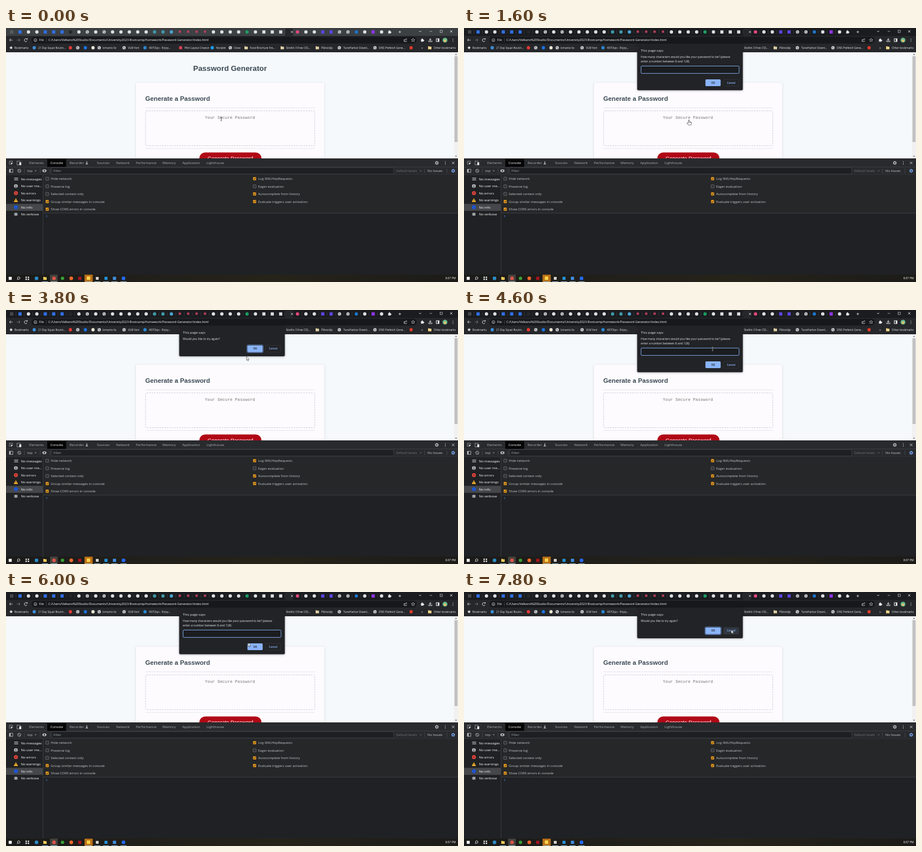
Recreate the animation shown at these times as an HTML page with a canvas. Size 800 by 450 pixels, loop 8 s.

```html
<!DOCTYPE html>
<html lang="en">
<head>
<meta charset="utf-8">
<title>Password Generator</title>
<style>
html, body { margin: 0; width: 100%; height: 100%; overflow: hidden; background: #202124; }
canvas { display: block; width: 100vw; height: 100vh; }
</style>
</head>
<body>
<canvas id="stage"></canvas>
<script>
const W = 800, H = 450, LOOP = 8000, STEP = 200;
const FOCUS_AT = 1000;
const PAGE_TOP = 43, PAGE_END = 231;
const canvas = document.getElementById('stage');
const ratio = window.devicePixelRatio || 1;
canvas.width = W * ratio;
canvas.height = H * ratio;
const c = canvas.getContext('2d');
c.scale(ratio, ratio);

const UI = '"Open Sans", "Noto Sans", sans-serif';
const ARIAL = '"Liberation Sans", Arial, sans-serif';
const MONO = '"Liberation Mono", monospace';
const LIGHT = '#e8eaed', GREY = '#9aa0a6', BLUE = '#8ab4f8';

// y is the middle of the line
function text(s, x, y, size, color = LIGHT, { font = UI, weight = 400, align = 'left' } = {}) {
  c.font = `${weight} ${size}px ${font}`;
  c.textAlign = align;
  c.fillStyle = color;
  c.fillText(s, x, y + size * 0.35);
}

function rect(x, y, w, h, color) {
  c.fillStyle = color;
  c.fillRect(x, y, w, h);
}

function round(x, y, w, h, r, fill, stroke, width = 1) {
  c.beginPath();
  c.roundRect(x, y, w, h, r);
  if (fill) { c.fillStyle = fill; c.fill(); }
  if (stroke) { c.strokeStyle = stroke; c.lineWidth = width; c.stroke(); }
}

function box(x, y, w, h, color, width = 0.8) {
  c.strokeStyle = color;
  c.lineWidth = width;
  c.strokeRect(x, y, w, h);
}

function dot(x, y, r, color) {
  c.beginPath();
  c.arc(x, y, r, 0, 7);
  c.fillStyle = color;
  c.fill();
}

function ring(x, y, r, color, width = 0.8) {
  c.beginPath();
  c.arc(x, y, r, 0, Math.PI * 2);
  c.strokeStyle = color;
  c.lineWidth = width;
  c.stroke();
}

function square(x, y, size, color) {
  rect(x - size / 2, y - size / 2, size, size, color);
}

// Each path is a flat list of x, y relative to the origin
function line(x, y, pts, color = LIGHT, width = 0.8) {
  trace(x, y, pts);
  c.strokeStyle = color;
  c.lineWidth = width;
  c.stroke();
}

function shape(x, y, pts, color) {
  trace(x, y, pts);
  c.closePath();
  c.fillStyle = color;
  c.fill();
}

function trace(x, y, pts) {
  c.beginPath();
  for (let i = 0; i < pts.length; i += 2) c.lineTo(x + pts[i], y + pts[i + 1]);
}

function cross(x, y, r, color = LIGHT) {
  line(x, y, [-r, -r, r, r], color);
  line(x, y, [r, -r, -r, r], color);
}

function globe(x, y) {
  dot(x, y, 3, '#c3c6ca');
  line(x, y, [-2, -1, 0, -0.5, 1, 1, 0, 2], '#5f6368', 0.8);
}

function gear(x, y, color) {
  ring(x, y, 2, color, 1.3);
  for (let a = 0; a < 8; a++) {
    const u = Math.cos(a * Math.PI / 4), v = Math.sin(a * Math.PI / 4);
    line(x, y, [u * 2.4, v * 2.4, u * 3.4, v * 3.4], color, 1);
  }
}

function dots(x, y) {
  for (const d of [-2.2, 0, 2.2]) dot(x, y + d, 0.6, LIGHT);
}

function star(x, y, r, fill) {
  const pts = [];
  for (let i = 0; i < 10; i++) {
    const a = i * Math.PI / 5 - Math.PI / 2, d = i % 2 ? r * 0.45 : r;
    pts.push(d * Math.cos(a), d * Math.sin(a));
  }
  if (fill) shape(x, y, pts, LIGHT);
  else line(x, y, [...pts, pts[0], pts[1]], LIGHT, 0.6);
}

function puzzle(x, y) {
  rect(x - 2.5, y - 1.5, 4.4, 4.2, LIGHT);
  dot(x - 0.3, y - 2, 1.1, LIGHT);
  dot(x + 2.2, y + 0.5, 1.1, LIGHT);
}

function folder(x, y, color = '#f2d58a') {
  rect(x - 3, y - 2.6, 2.6, 1.4, color);
  rect(x - 3, y - 1.9, 6, 4.6, color);
}

function caret(x, y, color = GREY) {
  shape(x, y, [-1.5, -0.8, 1.5, -0.8, 0, 1.2], color);
}

const tabColors = {
  b: '#2f6fe4', w: '#dcdee0', n: '#23272b', g: '#c3c6ca', t: '#3f98a6', p: '#4aa3cf',
  r: '#b8405d', e: '#1a9c61', k: '#e0487a', v: '#5b45e0', u: '#1e73c8', m: '#8f35e6'
};
const tabs = 'gbwwbbbnwgwgwwwwwttprrrrwwwwewwww kwwvvgguwmw';

function drawTabs(focused) {
  rect(0, 0, W, 14, focused ? '#1b1c1f' : '#3c4043');
  [...tabs].forEach((key, i) => {
    const x = 10 + i * 14.88;
    if (i) rect(x - 7.5, 4, 0.5, 6, '#4a4d51');
    if (key === ' ') {
      round(x - 7, 1, 14, 14, 2, '#25272a');
      cross(506, 7, 1.6);
    } else if ('bmv'.includes(key)) square(x, 7, 5.8, tabColors[key]);
    else if (key === 'r') square(x, 6.5, 4, tabColors[key]);
    else if (i === 0) {
      for (const d of [-2, 0, 2]) rect(x - 3, 6.6 + d, 6, 0.8, '#80868b');
    } else if (i > 29 && i < 33) square(x, 7, 5.6, tabColors[key]);
    else if (key === 'g') globe(x, 7);
    else dot(x, 7, 3, tabColors[key]);
  });
  puzzle(679, 7);
  line(697, 7, [-2.3, 0, 2.3, 0]);
  line(697, 7, [0, -2.3, 0, 2.3]);
  line(733, 6, [-2, -1, 0, 1, 2, -1]);
  line(752, 6, [-2.2, 0, 2.2, 0], LIGHT, 0.6);
  box(768.2, 4, 4, 4, LIGHT, 0.6);
  cross(788, 6, 2);
}

function drawAddressBar() {
  rect(0, 14, W, PAGE_TOP - 14, '#25272a');
  round(45, 15.5, 682, 12, 6, '#17181b');
  line(9, 21.5, [3, 0, -3, 0, -0.4, -2.5, -3, 0, -0.4, 2.5], '#c4c7c5');
  line(22, 21.5, [-3, 0, 3, 0, 0.4, -2.5, 3, 0, 0.4, 2.5], '#71767b');
  c.beginPath();
  c.arc(35, 21.5, 2.6, 0.5, 5.6);
  c.strokeStyle = LIGHT;
  c.lineWidth = 0.9;
  c.stroke();
  shape(37, 19.5, [-1.4, 0.8, 1.2, 0.8, 1.2, -1.8], LIGHT);
  ring(52, 21.5, 2.5, LIGHT, 0.7);
  line(52, 21.5, [0, -0.3, 0, 1.5]);
  text('File', 58.5, 21.5, 5.5);
  rect(71, 18, 0.5, 7, '#5f6368');
  text('C:/Users/Velkans%20Studio/Documents/University2023-Bootcamp/homework/Password-Generator/index.html', 75, 21.5, 5.5, '#fff');
  line(707, 21.5, [-1, -1, -2.5, -1, -2.5, 2.5, 2, 2.5, 2, 1], LIGHT, 0.7);
  line(707, 21.5, [-1, 1, 0, -1.5, 2.6, -1.5, 1.2, -3], LIGHT, 0.7);
  star(720.5, 21.5, 3.2);
  puzzle(737, 21.5);
  line(751, 21, [0, -3, 0, 1.2, -1.8, -0.6, 0, 1.2, 1.8, -0.6], LIGHT, 1);
  line(751, 21, [-3, 1.5, -3, 3, 3, 3, 3, 1.5], LIGHT, 1);
  box(761.5, 19, 5, 5, LIGHT, 1);
  rect(764.2, 19, 2.4, 5, LIGHT);
  dot(777, 21.5, 4.3, '#65b98f');
  dot(777, 22.5, 2.2, '#e8c168');
  dots(791, 21.5);
}

// icon x, icon colour ('g' globe, 'f' folder), label x, label
const bookmarks = [
  [50, '#3e8ed8', 57, '21 Day Squat Routin...'],
  [114, '#e53935'], [127, 'g'], [140.5, '#1b74e4'], [154, '#ece6d6'],
  [165, 'g', 171, 'Izmanto šo'], [209, 'g', 216, 'VLM font'],
  [246, '#2a86d1', 253, '407Clips - Enjoy...'], [309, '#d84055', 316, 'Plim Layout Creator'],
  [365, '#1d9bf0', 372, 'Norplet'], [397, 'g', 403, 'Close'],
  [425, 'f', 431.5, 'Food Brochure Fre...'], [489, 'f', 495.5, 'SiteKin 3 Free CSS...'],
  [551, 'f', 558, 'Plānotājs'], [590, 'g', 597, 'TuneHarbor Downl...'],
  [653, 'g', 660, 'DNS Prefetch Gene...'], [717, '#dd3b2a']
];

function drawBookmarks() {
  star(9, 35, 3.2, true);
  text('Bookmarks', 15, 35, 4.75);
  for (const [x, icon, tx, label] of bookmarks) {
    if (icon === 'g') globe(x, 35);
    else if (icon === 'f') folder(x, 35, '#dfcfa4');
    else dot(x, 35, 2.9, icon);
    if (label) text(label, tx, 35, 4.75);
  }
  text('»', 735, 34.5, 6);
  folder(750, 35);
  text('Other bookmarks', 757, 35, 4.75);
}

function drawPage() {
  const height = PAGE_END - PAGE_TOP;
  rect(0, PAGE_TOP, W, height, '#f5f9fc');
  c.save();
  c.beginPath();
  c.rect(0, PAGE_TOP, 793, height);
  c.clip();
  c.shadowColor = 'rgba(0,0,0,.15)';
  c.shadowBlur = 3.4 * ratio;
  c.shadowOffsetY = 0.8 * ratio;
  round(230, 97, 333.3, 180, 2, '#fdfbfe');
  c.shadowColor = 'transparent';
  const ink = '#3b4a54';
  text('Password Generator', 396.5, 71.6, 13.33, ink, { font: ARIAL, weight: 700, align: 'center' });
  text('Generate a Password', 246.6, 125, 11.25, ink, { font: ARIAL, weight: 700 });
  rect(246.6, 141, 300, 0.9, '#e2e4e7');
  rect(246.6, 212.8, 300, 0.9, '#e2e4e7');
  c.setLineDash([2.6, 1.8]);
  round(247, 146.8, 299.5, 61.7, 2, null, '#c3c5cf', 0.9);
  c.setLineDash([]);
  text('Your Secure Password', 396.4, 158.5, 7.4, '#757575', { font: MONO, align: 'center' });
  round(342.2, 220.4, 110, 21, 10.4, '#b00816');
  text('Generate Password', 397.2, 230.3, 9.17, '#fff', { font: ARIAL, align: 'center' });
  c.restore();
  rect(792.9, PAGE_TOP, 7.1, height, '#f1f1f1');
  rect(793.8, 50, 5.4, 152, '#c1c1c1');
  shape(796.5, 46.5, [-1.6, 1, 1.6, 1, 0, -1], '#555');
  shape(796.5, 227.5, [-1.6, -1, 1.6, -1, 0, 1], '#555');
}

function checkbox(x, y, label, on) {
  round(x - 2.7, y - 2.7, 5.4, 5.4, 0.8, on ? '#f5a11c' : '#303134', on ? null : '#85888c', 0.6);
  if (on) line(x, y, [-1.6, 0, -0.4, 1.3, 1.7, -1.4], '#202124', 1);
  text(label, x + 6.3, y, 5.9, '#c3c7cb');
}

function drawToolsHeader() {
  rect(0, PAGE_END, W, 260 - PAGE_END, '#292a2d');
  rect(0, 245.8, W, 0.6, '#494c50');
  rect(0, 259.8, W, 0.6, '#494c50');
  rect(73, 232, 33.5, 14, '#050506');
  line(9, 239, [2.5, -0.5, 2.5, -3, -3, -3, -3, 2.5, -0.5, 2.5], GREY);
  shape(9, 239, [-0.8, -0.8, 3.5, 0.8, 1.6, 1.6, 0.8, 3.5], LIGHT);
  box(19.5, 236, 5.5, 6.5, GREY);
  rect(23.5, 238, 3.4, 5, LIGHT);
  const labels = [[41, 'Elements'], [78.5, 'Console'], [112.5, 'Recorder'], [161, 'Sources'], [195, 'Network'],
    [230, 'Performance'], [277, 'Memory'], [312, 'Application'], [355, 'Lighthouse']];
  for (const [x, s] of labels) text(s, x, 239, 6, s === 'Console' ? '#fff' : '#aeb3b8');
  shape(143, 239, [-0.8, -2.8, 0.8, -2.8, 0.8, -0.6, 2.4, 2.8, -2.4, 2.8, -0.8, -0.6], GREY);
  rect(28, 235, 0.5, 8, '#494c50');
  gear(762.5, 239, '#bdc1c6');
  dots(777.5, 239);
  cross(791.5, 239, 2.2);

  box(6, 250.2, 6, 5.6, '#bdc1c6');
  rect(6, 250.2, 2.2, 5.6, '#bdc1c6');
  ring(23.5, 253, 2.8, '#bdc1c6');
  line(23.5, 253, [-2, -2, 2, 2], '#bdc1c6');
  for (const x of [32, 60, 78, 740, 780]) rect(x, 249, 0.5, 8, '#55585c');
  text('top', 37.5, 253, 5.9, '#c3c7cb');
  caret(52.5, 253);
  c.beginPath();
  c.ellipse(68, 253, 3.6, 2.4, 0, 0, 7);
  c.fillStyle = '#bdc1c6';
  c.fill();
  dot(68, 253, 1.3, '#292a2d');
  rect(81, 247.5, 605, 11, '#1e1f22');
  box(81, 247.5, 605, 11, '#44474b', 0.6);
  text('Filter', 84, 253, 5.9, '#a2a6ab');
  text('Default levels', 690.5, 253, 5.9, '#6d7175');
  caret(734, 253, '#6d7175');
  text('No Issues', 746, 253, 5.9, '#c3c7cb');
  gear(791.5, 253, '#7cacf8');
}

function drawTools() {
  drawToolsHeader();
  rect(0, 260.4, W, 177, '#202124');
  rect(66, 260.4, W - 66, 67.6, '#262729');
  rect(0, 311.5, 65, 12.4, '#45474b');
  rect(65.2, 260, 0.6, 177, '#494c50');
  rect(66, 327.7, W - 66, 0.6, '#494c50');

  const rows = ['messages', 'user me...', 'errors', 'warnings', 'info', 'verbose'];
  rows.forEach((s, i) => text('No ' + s, 26.5, 267.5 + i * 12.5, 5.95, '#fff'));
  for (const d of [-2, 0, 2]) rect(14.5, 267 + d, 7, 0.9, '#bdc1c6');
  dot(17.5, 280, 3.3, '#bdc1c6');
  dot(17.5, 279, 1.1, '#3c4043');
  rect(15.8, 281, 3.4, 1.2, '#3c4043');
  dot(17.5, 292.5, 3.5, '#e8453c');
  cross(17.5, 292.5, 1.4, '#202124');
  shape(17.5, 305, [0, -3.4, 3.8, 3.2, -3.8, 3.2], '#fdb52b');
  line(17.5, 305, [0, -1.2, 0, 1], '#202124');
  dot(17.5, 317.6, 3.5, '#1a56db');
  line(17.5, 317.6, [0, -0.5, 0, 1.8], '#45474b');
  dot(17.5, 330, 2.4, '#bdc1c6');
  for (const d of [-1.8, 0, 1.8]) line(17.5, 330 + d, [-3.3, 0, 3.3, 0], '#bdc1c6', 0.6);
  line(17.5, 330, [-1, 0, 1, 0], '#202124');

  const left = ['Hide network', 'Preserve log', 'Selected context only',
    'Group similar messages in console', 'Show CORS errors in console'];
  const right = ['Log XMLHttpRequests', 'Eager evaluation', 'Autocomplete from history',
    'Evaluate triggers user activation'];
  left.forEach((s, i) => checkbox(73, 267 + i * 13.5, s, i > 2));
  right.forEach((s, i) => checkbox(440, 267 + i * 13.5, s, i !== 1));
  line(72, 333.3, [-0.8, -1.6, 0.8, 0, -0.8, 1.6], '#4f8df5', 0.9);
}

function drawTaskbar() {
  const g = c.createLinearGradient(0, 0, W, 0);
  g.addColorStop(0, '#1a1a19');
  g.addColorStop(0.3, '#211f1a');
  g.addColorStop(0.6, '#26231a');
  g.addColorStop(1, '#1c1b18');
  rect(0, 437, W, 13, g);
  square(7.5, 443.5, 5.4, '#f4f4f4');
  ring(22.5, 443, 2.2, LIGHT, 0.9);
  line(22.5, 443, [-1.6, 1.6, -3, 3.2], LIGHT, 1);
  for (const x of [34.5, 38.5]) {
    rect(x, 440.5, 2.4, 2.4, LIGHT);
    rect(x, 444, 2.4, 2.4, LIGHT);
  }
  rect(139, 437, 14.5, 13, '#b86f17');
  dot(54, 443.5, 3.2, '#2c8bc4');
  folder(69, 443.5, '#f6cd58');
  rect(78, 437, 13.5, 13, '#44423c');
  dot(85, 443.5, 3.2, '#d9534a');
  dot(100, 443.5, 3, '#3aa034');
  dot(115.5, 443.5, 3.2, '#f06a2b');
  square(130.5, 443.5, 5.6, '#a81520');
  square(146, 443.2, 6, '#ffd24a');
  square(161.5, 443.5, 5, '#d6d4cf');
  square(177, 443.5, 5.4, '#2493db');
  square(192, 443.5, 5.6, '#3f8fe3');
  dot(208, 443.5, 3.3, '#2568f0');
  for (const x of [69, 85, 146, 161.5, 177, 192, 208]) rect(x - 5.5, 449, 11, 1, '#8db4d0');
  text('8:07 PM', 796, 443.5, 4.9, '#fff', { align: 'right' });
}

function button(x, y, label, { primary, focus, hover } = {}) {
  if (focus) round(x - 0.7, y - 0.7, 29, 14, 2.2, null, '#6288c2', 0.8);
  const fill = primary ? (hover ? '#7b9fdb' : BLUE) : hover ? '#303742' : null;
  round(x + 0.3, y + 0.3, 27, 12, 1.6, fill, primary ? null : '#3c4043', 0.5);
  text(label, x + 13.8, y + 6.3, 4.8, primary ? '#202124' : BLUE, { weight: 600, align: 'center' });
}

function drawDialog(kind, hover) {
  const ask = kind === 'prompt';
  c.save();
  c.shadowColor = 'rgba(0,0,0,.35)';
  c.shadowBlur = 3.5 * ratio;
  c.shadowOffsetY = 0.8 * ratio;
  round(306.5, 28, 187, ask ? 82.3 : 54, [0, 0, 2, 2], '#222326');
  c.restore();
  text('This page says', 313, 39.6, 5.95);
  if (ask) {
    text('How many characters would you like your password to be? (please', 313, 51.4, 5.13);
    text('enter a number between 8 and 128)', 313, 59.6, 5.13);
    round(313.4, 67.4, 173.4, 13, 1.5, '#1a1c20', BLUE, 0.9);
    button(427, 90.8, 'OK', { primary: true, hover });
    button(459, 90.8, 'Cancel');
  } else if (kind === 'alert') {
    text('Please enter a number between 8 and 128', 313, 51.4, 5.13);
    button(459.5, 62.4, 'OK', { primary: true, focus: true, hover });
  } else {
    text('Would you like to try again?', 313, 51.4, 5.13);
    button(427, 62.4, 'OK', { primary: true, focus: true });
    button(459, 62.4, 'Cancel', { hover });
  }
}

const pointers = {
  // inverts whatever lies below it
  beam(x, y) {
    c.globalCompositeOperation = 'difference';
    line(x, y, [0, -2.8, 0, 2.8], '#ddd', 0.8);
    for (const d of [-3.1, 3.1]) line(x, y + d, [-1.3, 0, 1.3, 0], '#ddd', 0.6);
    c.globalCompositeOperation = 'source-over';
  },
  arrow(x, y) {
    const pts = [0, 0, 0, 6.6, 1.5, 5.2, 2.6, 7.7, 3.6, 7.2, 2.6, 4.9, 4.7, 4.8];
    shape(x, y, pts, '#fff');
    line(x, y, [...pts, 0, 0], '#111', 0.5);
  },
  hand(x, y) {
    const pts = [-0.8, 0, 0.6, 0, 0.8, 3, 4.4, 4, 4.6, 6.4, 3.6, 9, -0.8, 9, -3.6, 5.6, -2.8, 4.8, -1, 6];
    shape(x, y, pts, '#fff');
    line(x, y, [...pts, -0.8, 0], '#222', 0.6);
    for (const d of [1, 2.2, 3.2]) line(x + d, y, [0, 3.4, 0, 5], '#222', 0.4);
  }
};

// time, x, y, pointer from then on
const route = [
  [0, 381, 161, 'beam'], [200, 381, 161, 'beam'], [600, 394, 213, 'arrow'], [800, 400, 228, 'hand'],
  [1000, 400, 228, 'hand'], [1600, 398, 163, 'hand'], [2600, 421, 134.5, 'hand'],
  [3000, 470, 69, 'arrow'], [3200, 470, 69, 'arrow'], [3800, 425.7, 82.5, 'arrow'],
  [4200, 440, 69, 'arrow'], [4600, 440, 69, 'beam'], [5000, 424, 76, 'beam'], [5400, 410, 77, 'beam'],
  [5600, 410, 77, 'beam'], [5800, 417, 84, 'arrow'], [6200, 440, 96, 'arrow'], [6400, 440, 96, 'arrow'],
  [6800, 479, 68, 'arrow'], [7000, 479, 68, 'arrow'], [7800, 473, 67, 'arrow']
];

const dialogs = [[FOCUS_AT, 'prompt'], [2400, 'alert'], [3400, 'confirm'], [4400, 'prompt'], [6400, 'alert'], [7200, 'confirm']];

function drawPointer(t) {
  const i = route.findLastIndex(k => k[0] <= t);
  const a = route[i], b = route[i + 1] || a;
  const u = b === a ? 0 : (t - a[0]) / (b[0] - a[0]);
  const e = u * u * (3 - 2 * u);
  pointers[a[3]](a[1] + (b[1] - a[1]) * e, a[2] + (b[2] - a[2]) * e);
}

function draw(t) {
  drawTabs(t >= FOCUS_AT);
  drawAddressBar();
  drawBookmarks();
  drawPage();
  drawTools();
  drawTaskbar();
  const open = dialogs.findLast(d => d[0] <= t);
  const hover = t >= 3000 && t < 3400 || t >= 6200 && t < 6400 || t >= 6800;
  if (open) drawDialog(open[1], hover);
  drawPointer(t);
}

const start = performance.now();
let shown = -1;
function tick() {
  const t = Math.floor((performance.now() - start) % LOOP / STEP) * STEP;
  if (t !== shown) draw(shown = t);
  requestAnimationFrame(tick);
}
tick();
</script>
</body>
</html>
```
